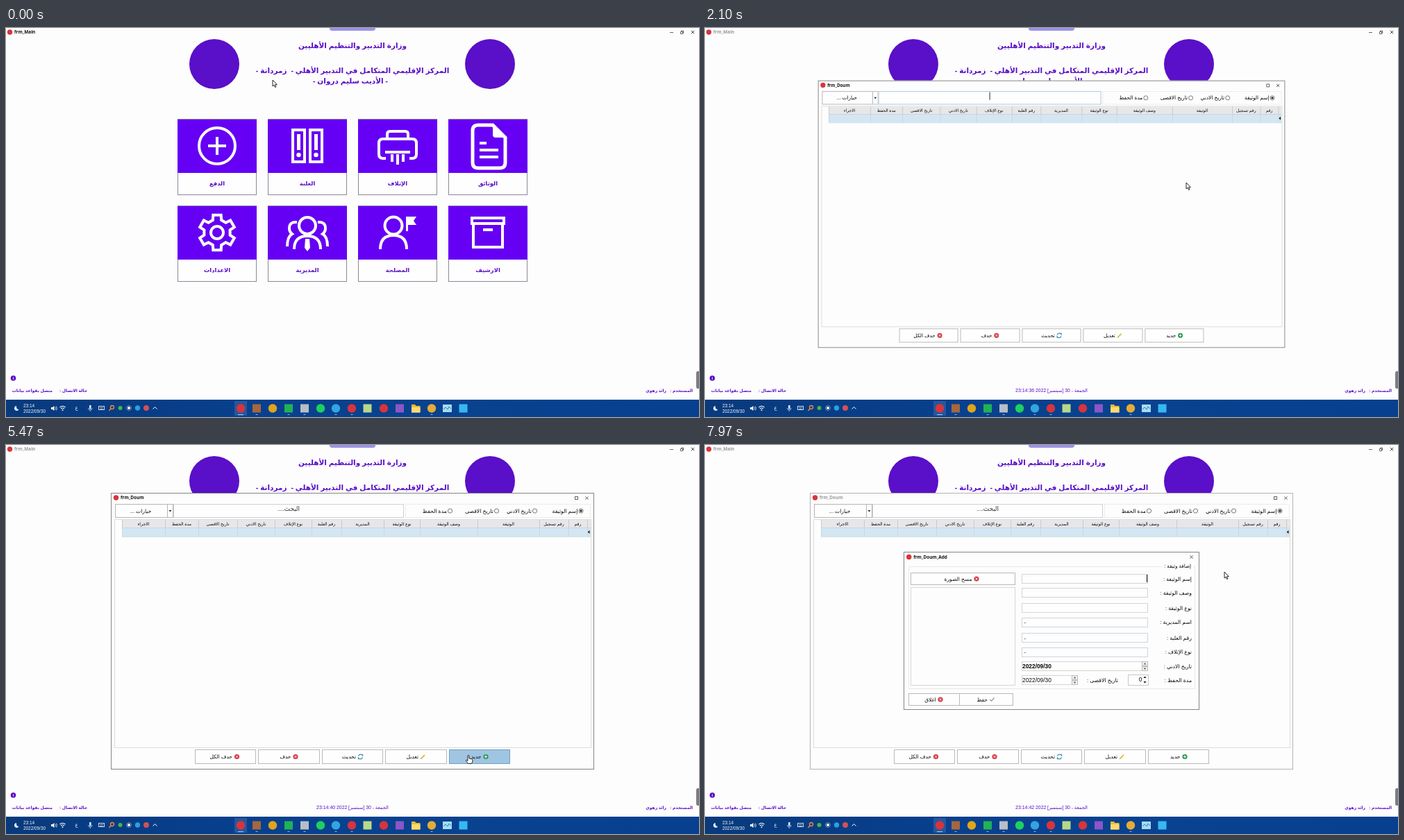
Animation of 998x561 px, one loop 8 s. Source, as an HTML page with a canvas:

```html
<!DOCTYPE html>
<html lang="ar">
<head>
<meta charset="utf-8">
<title>Archive desk</title>
<style>
html, body { margin: 0; width: 100%; height: 100%; overflow: hidden; background: #fdfdfd; }
canvas { display: block; width: 998px; height: 561px; }
</style>
</head>
<body>
<canvas id="stage" width="998" height="561"></canvas>
<script>
const ctx = document.getElementById('stage').getContext('2d');
const LOOP = 8000, LIST_OPEN = 2000, ADD_OPEN = 5560, OPEN_MS = 250;
const FONT = '"Liberation Sans", "DejaVu Sans", sans-serif';
const PURPLE = '#6600f5', INK = '#5a0fc8', RED = '#d8343c', PAPER = '#fdfdfd';

function text(str, x, y, size, { align = 'center', color = '#0c0c0c', bold = false, font = FONT } = {}) {
  ctx.font = `${bold ? 'bold ' : ''}${size}px ${font}`;
  ctx.direction = /[\u0600-\u06ff]/.test(str) ? 'rtl' : 'ltr';
  ctx.textAlign = align;
  ctx.textBaseline = 'middle';
  ctx.fillStyle = color;
  ctx.fillText(str, x, y + 0.5);
}

function rect(x, y, r, b, fill, stroke) {
  if (fill) { ctx.fillStyle = fill; ctx.fillRect(x, y, r - x, b - y); }
  if (stroke) {
    ctx.strokeStyle = stroke;
    ctx.lineWidth = 1;
    ctx.strokeRect(x + 0.5, y + 0.5, r - x - 1, b - y - 1);
  }
}

function disc(x, y, r, color) {
  ctx.fillStyle = color;
  ctx.beginPath();
  ctx.arc(x, y, r, 0, 7);
  ctx.fill();
}

function stroke(d, width, color) {
  ctx.lineWidth = width;
  ctx.strokeStyle = color;
  ctx.stroke(new Path2D(d));
}

function fill(d, color) {
  ctx.fillStyle = color;
  ctx.fill(new Path2D(d));
}

const ring = (x, y, r) => `M${x - r} ${y}a${r} ${r} 0 1 0 ${2 * r} 0a${r} ${r} 0 1 0 ${-2 * r} 0`;
const cross = (x, y, r) => `M${x - r} ${y - r}l${2 * r} ${2 * r}m0 ${-2 * r}l${-2 * r} ${2 * r}`;

function gear(x, y) {
  let d = '';
  for (let i = 0; i < 6; i++) {
    [[-0.33, 19], [-0.22, 26], [0.22, 26], [0.33, 19]].forEach(([off, r]) => {
      const a = i * Math.PI / 3 - Math.PI / 2 + off;
      d += `${d ? 'L' : 'M'}${x + r * Math.cos(a)} ${y + r * Math.sin(a)}`;
    });
  }
  return d + 'z' + ring(x, y, 9);
}

const binder = x => {
  stroke(`M${x + 2} 147h17v46h-17z`, 4, '#fff');
  stroke(`M${x + 10.5} 153v23`, 5, '#fff');
  disc(x + 10.5, 183, 3.2, '#fff');
};

const tiles = [
  ['الدفع', () => stroke(ring(304, 170, 26) + 'M291 170h26M304 157v26', 4, '#fff')],
  ['العلبة', () => { binder(411); binder(436); }],
  ['الإتلاف', () => {
    stroke('M549 159v-6q0-4 4-4h22q4 0 4 4v6M547 188h-4q-6 0-6-6v-16q0-6 6-6h42q6 0 6 6v16q0 6-6 6h-4', 4, '#fff');
    stroke('M546 179h36M556 182v11M564 182v15M572 182v11', 4, '#fff');
  }],
  ['الوثائق', () => {
    stroke('M680 140h21l18 18v36q0 8-8 8h-31q-8 0-8-8v-46q0-8 8-8z', 5, '#fff');
    fill('M701 140l18 18h-14q-4 0-4-4z', '#fff');
    stroke('M682 166h10M682 176h27M682 186h27', 4, '#fff');
  }],
  ['الاعدادات', () => stroke(gear(304, 295), 4, '#fff')],
  ['المديرية', () => {
    stroke(ring(434, 285, 12) + 'M415 319q0-19 19-19t19 19', 4, '#fff');
    stroke('M419 280q-11-1-11 9 0 5 4 8-7 4-7 18M449 280q11-1 11 9 0 5-4 8 7 4 7 18', 4, '#fff');
    fill('M431 304h6l1 13-4 5-4-5z', '#fff');
  }],
  ['المصلحة', () => {
    stroke(ring(558, 285, 12.5) + 'M539 319q0-20 19-20t19 20', 4, '#fff');
    fill('M576 272h15l-4 6 4 6h-12v9h-3z', '#fff');
  }],
  ['الارشيف', () => stroke('M671 274h46v8h-46zM673 282h42v34h-42zM687 291h14', 4, '#fff')]
];

const tilePos = i => [247 + (i % 4) * 130, i < 4 ? 131 : 256];

function drawTiles() {
  tiles.forEach(([label, icon], i) => {
    const [x, y] = tilePos(i);
    rect(x, y, x + 114, y + 110, '#fefefe', '#8b8896');
    rect(x, y + 1, x + 114, y + 78, PURPLE);
    icon();
    text(label, x + 57, y + 93, 8.4, { color: INK, bold: true });
  });
}

function clockText(t) {
  return '23:14:' + Math.floor(34.7 + t / 1000);
}

function windowTitle(str, x, y, active) {
  disc(x, y, 3.7, RED);
  text(str, x + 6.5, y, 6.4, {
    align: 'left', bold: true, color: active ? '#111' : '#999', font: '"Open Sans", sans-serif'
  });
}

function drawMain(t) {
  rect(0, 0, 998, 561, PAPER);
  windowTitle('frm_Main', 5.5, 6, t < LIST_OPEN);
  stroke('M956 6.5h5M971.5 5.5h3v3h-3zM972.5 5v-1h3v3.5h-1', 0.9, '#555');
  stroke(cross(989, 6, 2.2), 1, '#444');
  fill('M466 0h66v1q0 3-4 3h-58q-4 0-4-3z', '#9d93e6');

  disc(300, 52, 36, INK);
  disc(697, 52, 36, INK);
  const head = { color: INK, bold: true };
  text('وزارة التدبير والتنظيم الأهليين', 499, 26, 10.5, head);
  text('المركز الإقليمي المتكامل في التدبير الأهلي -  زمردانة -', 499, 61.5, 10.5, head);
  text('- الأديب سليم دروان -', 496, 76.5, 10.5, head);
  drawTiles();

  disc(10.5, 505, 3.8, INK);
  text('i', 10.5, 505, 6, { color: '#fff', bold: true });
  const foot = { color: INK, bold: true, align: 'right' };
  text('متصل بقواعد بيانات', 67, 522.5, 6, foot);
  text('حالة الاتصال :', 117, 522.5, 6, foot);
  text('المستخدم :', 989, 522.5, 6, foot);
  text('رائد زهوي', 951, 522.5, 6, foot);
  if (t >= 300) {
    text('الجمعة ، 30 [سبتمبر] 2022', 551, 522.5, 6.8, { color: INK, align: 'right' });
    text(clockText(t), 447, 522.5, 7, { color: INK, align: 'left' });
  }
  fill('M994 498q0-3 2-3h2v25h-2q-2 0-2-3z', '#7c7c80');
}

function drawTaskbar() {
  const g = ctx.createLinearGradient(0, 0, 998, 0);
  g.addColorStop(0, '#083a7c');
  g.addColorStop(0.35, '#08408e');
  g.addColorStop(0.65, '#09428f');
  g.addColorStop(1, '#06408f');
  rect(0, 536, 998, 561, g);

  fill('M15 545a3.5 3.5 0 1 0 3.5 5q-4 0-3.5-5z', '#dfe8f5');
  const white = { color: '#f4f7fc', align: 'left' };
  text('23:14', 25, 544.5, 6.4, white);
  text('2022/09/30', 25, 552.5, 6.4, white);
  fill('M65 547h2l2.5-2v7l-2.5-2h-2z', '#fff');
  stroke('M71 546.5q1.5 2 0 4M72.5 545.5q2 3 0 6', 0.7, '#fff');
  stroke('M77.5 547q4-3.5 8 0M79 549q2.5-2 5 0', 1.1, '#fff');
  disc(81.5, 551, 1, '#fff');
  text('ع', 101.5, 548, 7, { color: '#fff' });
  stroke('M118.5 548q0 3 2.8 3t2.8-3M121.3 551v2', 0.8, '#bfd8f5');
  rect(120, 544, 122.6, 549.5, '#cfe2f8');
  rect(133, 545, 142, 551, null, '#cfd9e8');
  stroke('M135 547.5h5M135.5 549.5h4', 0.7, '#cfd9e8');
  stroke(ring(153, 547, 2.5) + 'M151 549l-2.5 3', 1.3, '#f08a3c');
  disc(164.5, 548, 3, '#43b649');
  disc(177, 548, 2, '#fff');
  for (let i = 0; i < 8; i++) {
    const a = i * Math.PI / 4, c = Math.cos(a), s = Math.sin(a);
    stroke(`M${177 + 2.7 * c} ${548 + 2.7 * s}l${1.3 * c} ${1.3 * s}`, 0.9, '#fff');
  }
  disc(189.5, 548, 3.7, '#2a9fe0');
  disc(202, 548, 4, '#d25058');
  stroke('M211.5 549.5l3-3 3 3', 1, '#fff');

  rect(329, 538, 347, 559, 'rgba(255,255,255,.12)');
  const apps = [
    [338, RED, 1], [361, '#a5673f', 0], [384, '#e0a51b', 1], [407, '#20b257', 0],
    [430, '#b8bec6', 0], [453, '#1ed05f', 1], [475, '#32a5df', 1], [498, RED, 1],
    [520.5, '#b9d887', 0], [544, RED, 1], [567, '#8c55c8', 0], [613, '#e4ac36', 1], [658.5, '#35b8f2', 0]
  ];
  apps.forEach(([x, color, round]) => round
    ? disc(x, 548.5, 6.2, color)
    : rect(x - 6, 542.5, x + 6, 554.5, color));
  fill('M584 543h5l1.5 2h6v9.5h-12.5z', '#f2ba35');
  rect(584, 547, 596.5, 554.5, '#ffda72');
  rect(629, 543, 642, 554, '#a6dbf4');
  stroke('M630 550l3-3 3 3 2-4 3 3', 1, '#317eb2');
  [361, 407, 430, 475, 498, 613].forEach(x => rect(x - 1.5, 557, x + 1.5, 558, '#9fb4cf'));
  rect(334, 557, 342, 558.2, '#86c6f5');
}

function badge(kind, x, y) {
  if (kind === 'x') {
    disc(x, y, 3.6, '#d83b43');
    stroke(cross(x, y, 1.4), 1, '#fff');
  } else if (kind === '+') {
    disc(x, y, 3.6, '#249b50');
    stroke(`M${x - 2} ${y}h4M${x} ${y - 2}v4`, 1.1, '#fff');
  } else if (kind === 'refresh') {
    stroke(`M${x - 3} ${y - 1}q1-2.5 3.5-2.3 1.5 0 2.5 1.5v-2M${x + 3} ${y + 1}q-1 2.5-3.5 2.3-1.5 0-2.5-1.5v2`, 1.3, '#3c8fae');
  } else if (kind === 'pencil') {
    stroke(`M${x - 2.5} ${y + 2.5}l5-5`, 1.9, '#dfc33c');
    stroke(`M${x - 3.3} ${y + 3.3}l1-1`, 1, '#666');
  } else {
    stroke(`M${x - 3} ${y}l2 2.3 4-4.8`, 1, '#555');
  }
}

function button(x, r, y, b, label, textEnd, kind, hot) {
  rect(x, y, r, b, hot ? '#9fc5e3' : '#fefefe', hot ? '#6d9fc4' : '#b9b9b9');
  const mid = (y + b) / 2;
  text(label, textEnd, mid, 7.5, { align: 'right' });
  badge(kind, textEnd + 6.5, mid);
}

// Runs a painter with the zoom-and-fade of a freshly opened window.
function opened(t, start, paint) {
  if (t < start) return;
  const u = Math.min(1, (t - start) / OPEN_MS);
  const k = 0.842 + 0.158 * (1 - (1 - u) ** 3);
  ctx.save();
  ctx.globalAlpha = Math.min(1, u / 0.3);
  ctx.translate(499, 268);
  ctx.scale(k, k);
  ctx.translate(-499, -268);
  paint();
  ctx.restore();
}

const columns = [
  [167, 'الاجراء'], [229, 'مدة الحفظ'], [277, 'تاريخ الاقصى'], [333, 'تاريخ الادني'],
  [387, 'نوع الإتلاف'], [440, 'رقم العلبة'], [483, 'المديرية'], [544, 'نوع الوثيقة'],
  [596, 'وصف الوثيقة'], [679, 'الوثيقة'], [768, 'رقم تسجيل'], [810, 'رقم'], [837]
];
const radios = [[828, 'إسم الوثيقة'], [761.5, 'تاريخ الادني'], [706.5, 'تاريخ الاقصى'], [639.5, 'مدة الحفظ']];

const inside = (p, x, y, r, b) => p.x >= x && p.x <= r && p.y >= y && p.y <= b;
const overNew = (t, p) => t > 4800 && t < ADD_OPEN + 80 && inside(p, 638, 439, 726, 460);

function drawList(t, p) {
  const active = t < ADD_OPEN;
  rect(151, 69, 847, 468, PAPER, active ? '#858585' : '#b4b4b4');
  windowTitle('frm_Doum', 158.5, 76, active);
  if (active && inside(p, 829, 69, 845, 83)) rect(829, 70, 843, 82, '#cbe4f7');
  rect(819, 74, 824, 79, null, '#666');
  stroke(cross(836.5, 76.5, 2), 1, '#444');

  rect(157, 85, 241, 105, '#fefefe', '#b5b5b5');
  rect(232, 86, 233, 104, '#b5b5b5');
  fill('M234.5 94h4l-2 2.5z', '#222');
  text('خيارات ...', 194, 95, 7.6);
  const focused = t < 5380;
  rect(241, 85, 573, 105, '#fefefe', focused && t < 2600 ? '#a9c8e0' : '#c9d0d7');
  if (!focused) text('البحث....', 407, 92.5, 8.8, { color: '#333' });
  else if ((t - LIST_OPEN) % 1060 < 530) rect(406.5, 86.5, 407.5, 98, '#222');

  rect(575, 85, 842, 105, null, '#ececec');
  radios.forEach(([x, label], i) => {
    stroke(ring(x, 95, 3.1), 0.8, '#555');
    if (!i) disc(x, 95, 1.7, '#222');
    text(label, x - 4.7, 95, 7.7, { align: 'right' });
  });

  rect(156, 107, 843, 437, null, '#dcdcd8');
  rect(167, 108, 842, 119, '#e7e7e9');
  rect(167, 119, 842, 132, '#d3e6f1');
  columns.forEach(([x, label], i) => {
    rect(x, 108, x + 0.7, 119, '#bdbdbf');
    rect(x, 119, x + 0.7, 132, '#c0d3df');
    if (label) text(label, (x + columns[i + 1][0]) / 2, 113.5, 6.2);
  });
  rect(167, 119, 842, 119.7, '#c4ced5');
  rect(167, 132, 842, 132.7, '#c6d6df');
  fill('M840.5 123v5l-2.7-2.5z', '#111');

  button(272, 360, 439, 460, 'حدف الكل', 326, 'x');
  button(363, 452, 439, 460, 'حدف', 410.5, 'x');
  button(455, 543, 439, 460, 'تحديث', 504, 'refresh');
  button(546, 635, 439, 460, 'تعديل', 594, 'pencil');
  button(638, 726, 439, 460, 'جديد', 684.5, '+', overNew(t, p));
}

const fields = [
  ['إسم الوثيفة :', 193], ['وصف الوثيقة :', 213], ['نوع الوثيقة :', 235], ['اسم المديرية :', 255.5, '-'],
  ['رقم العلبة :', 278, '-'], ['نوع الإتلاف :', 298.5, '-'], ['تاريخ الادني :', 319], ['مدة الحفظ :', 339]
];

function spinner(x, y, framed) {
  if (framed) {
    rect(x - 4, y - 7, x + 5, y, '#f4f4f4', '#bbb');
    rect(x - 4, y, x + 5, y + 7, '#f4f4f4', '#bbb');
  }
  fill(`M${x - 1.5} ${y - 2.5}h4l-2-2.5zM${x - 1.5} ${y + 2.5}h4l-2 2.5z`, framed ? '#666' : '#111');
}

function drawAdd(t) {
  rect(286, 154, 712, 382, PAPER, '#858585');
  windowTitle('frm_Doum_Add', 293.7, 161.5, true);
  stroke(cross(700.5, 161.5, 2), 1, '#444');
  rect(293, 175, 706, 352, null, '#e8e8e5');
  rect(658, 173, 703, 178, PAPER);
  text('إضافة وثيقة :', 700, 175, 7.2, { align: 'right' });

  button(296, 447, 184, 202, 'مسح الصورة', 384.5, 'x');
  rect(296, 205, 447, 347, null, '#d6d6d2');
  fields.forEach(([label, y, value], i) => {
    text(label, 701, y, 7.7, { align: 'right' });
    if (i === 7) return;
    const top = Math.round(y - 7);
    rect(456, top, 638, top + 14, '#fefefe', i > 2 && i < 6 ? '#ccd5de' : '#d4d4d0');
    if (value) text(value, 459.5, y, 8, { align: 'left' });
  });
  if ((t - 6520) % 1060 < 530) rect(636, 187, 637, 198, '#111');

  text('2022/09/30', 457, 319, 8.4, { align: 'left', bold: true });
  spinner(633, 319, true);
  rect(456, 332, 537, 346, '#fefefe', '#d4d4d0');
  text('2022/09/30', 457, 339, 8.4, { align: 'left' });
  spinner(532, 339, true);
  text('تاريخ الاقصى :', 595, 339, 7.7, { align: 'right' });
  rect(609, 331, 639, 347, '#fefefe', '#c8c8c8');
  text('0', 627, 338, 8.4);
  spinner(633, 338.5);

  button(293, 367, 358, 376, 'اغلاق', 332.5, 'x');
  button(366, 444, 358, 376, 'حفظ', 407, 'check');
}

// Pointer stops: time, x, y.
const stops = [
  [0, 384, 75], [100, 384, 75], [800, 48, 388], [1000, 48, 388], [1700, 694, 178], [1860, 694, 178],
  [2060, 693, 223], [2800, 693, 223], [3700, 836, 73], [4250, 836, 73], [5250, 666, 448],
  [5650, 666, 448], [6450, 748, 183], [LOOP, 748, 183]
];

function pointerAt(t) {
  const i = stops.findIndex(s => s[0] > t);
  const [t0, x0, y0] = stops[i - 1], [t1, x1, y1] = stops[i];
  const u = (t - t0) / (t1 - t0), e = u * u * (3 - 2 * u);
  return { x: x0 + (x1 - x0) * e, y: y0 + (y1 - y0) * e };
}

function drawPointer(t, p) {
  const overTile = t < LIST_OPEN && tiles.some((_, i) => {
    const [x, y] = tilePos(i);
    return inside(p, x, y, x + 114, y + 110);
  });
  ctx.save();
  ctx.translate(p.x, p.y);
  const d = overTile || overNew(t, p)
    ? 'M-1 0q1-1 2 0v4l4 1q1 .5 1 1.5l-.5 3-1 2h-5l-3-4q-.5-1.5 1-1l1.5 1z'
    : 'M0 0v9l2-1.8 1.5 3.3 1.5-.7-1.5-3.1h2.8z';
  fill(d, '#fff');
  stroke(d, 0.9, '#111');
  ctx.restore();
}

function frame(now) {
  const t = now % LOOP, p = pointerAt(t);
  drawMain(t);
  opened(t, LIST_OPEN, () => drawList(t, p));
  opened(t, ADD_OPEN, () => drawAdd(t));
  drawTaskbar();
  drawPointer(t, p);
  requestAnimationFrame(frame);
}
requestAnimationFrame(frame);
</script>
</body>
</html>
```
